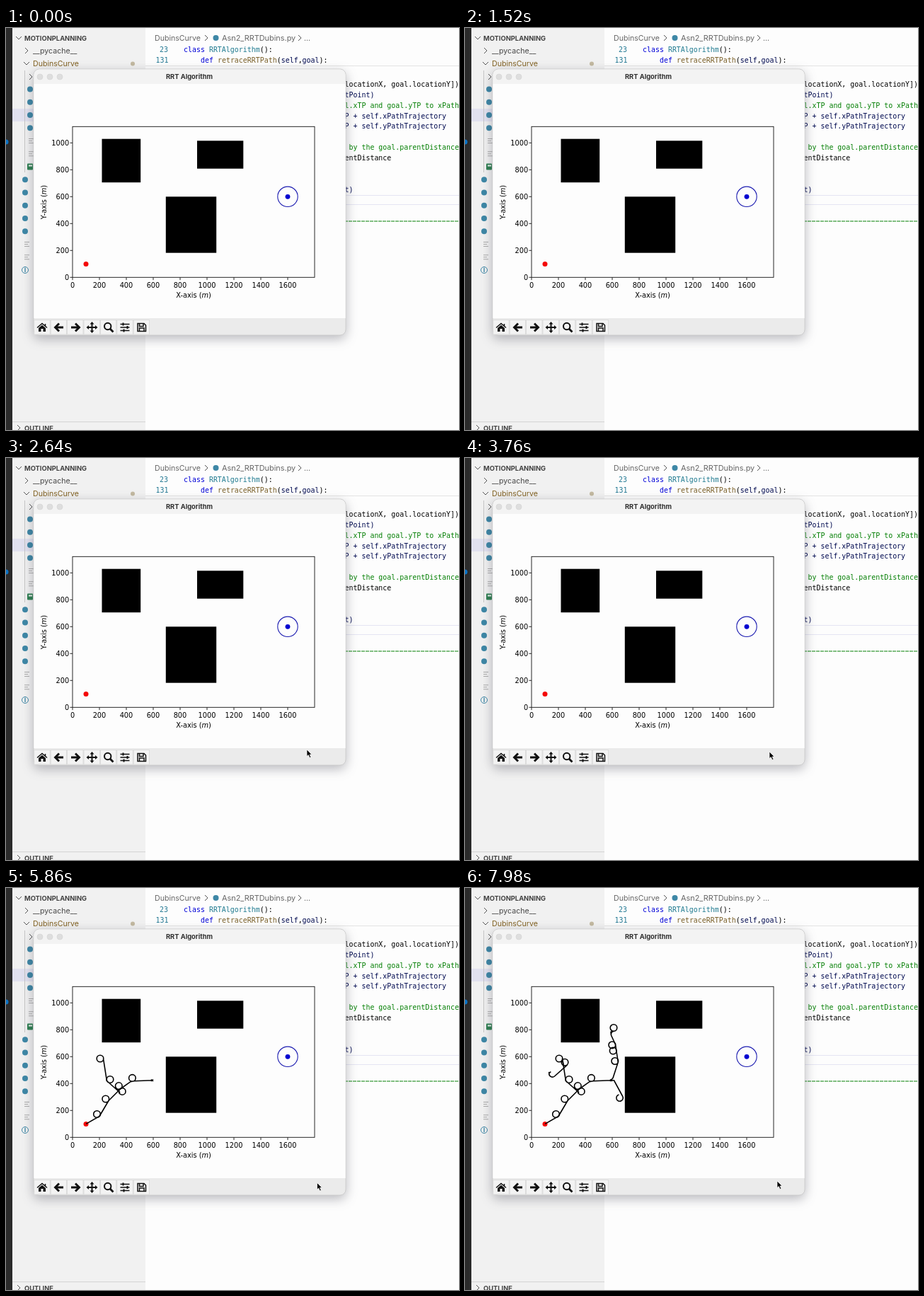
Animation, 640 px wide and 568 px high, one loop 8 s. Source, as an HTML page:

```html
<!DOCTYPE html>
<html lang="en">
<head>
<meta charset="utf-8">
<title>RRT Algorithm</title>
<style>
  html, body { margin: 0; width: 100%; height: 100%; overflow: hidden; background: #fdfdfd; }
  svg { display: block; width: 640px; height: 568px; }
  .ui { font-family: Inter, "Open Sans", sans-serif; font-size: 10.6px; }
  .file { font-size: 10.9px; }
  .bold { font-weight: 700; font-size: 9.35px; }
  .code { font-family: "DejaVu Sans Mono", monospace; font-size: 9.95px; }
  .plot { font-family: "DejaVu Sans", sans-serif; font-size: 9.8px; fill: #000; }
  .window { filter: drop-shadow(0 5px 8px rgba(60, 60, 75, .35)); }
  .line { fill: none; stroke: #000; stroke-width: 1.6; }
  .icon { fill: none; stroke: #111; stroke-width: 2; }
  .bolder { stroke-width: 2.9; }
  .thin { stroke-width: 1.5; }
  .chevron { fill: none; stroke: #555; stroke-width: 1; }
</style>
</head>
<body>
<svg id="stage" viewBox="0 0 640 568"></svg>
<script>
const LOOP = 8000;
const NS = "http://www.w3.org/2000/svg";
const stage = document.getElementById("stage");

function add(tag, attrs, parent = stage) {
  const el = document.createElementNS(NS, tag);
  for (const [name, value] of Object.entries(attrs)) el.setAttribute(name, value);
  return parent.appendChild(el);
}
const rect = (x, y, width, height, fill, more) => add("rect", { x, y, width, height, fill, ...more });
const dot = (cx, cy, r, fill, more) => add("circle", { cx, cy, r, fill, ...more });
const path = (d, cls, more) => add("path", { d, class: cls, ...more });
function text(x, y, content, cls, fill, more = {}) {
  const el = add("text", { x, y, class: cls, fill, ...more });
  el.textContent = content;
  return el;
}
function code(x, y, ...parts) {
  const el = add("text", { x, y, class: "code" });
  el.style.whiteSpace = "pre";
  for (const [fill, content] of parts) add("tspan", { fill }, el).textContent = content;
}
const right = (x, y) => path(`M${x - 2} ${y - 4}l4 4l-4 4`, "chevron");
const down = (x, y) => path(`M${x - 4} ${y - 2}l4 4l4 -4`, "chevron");

function drawSidebar() {
  const teal = "#3d87a6";
  rect(9, 0, 188, 568, "#f1f1f1");
  rect(0, 0, 9, 568, "#2b2b2b");
  dot(0, 161, 3.5, "#0a74c8");
  down(18, 14);
  text(26, 17.5, "MOTIONPLANNING", "ui bold", "#424242");
  right(29, 32);
  text(38, 36, "__pycache__", "ui", "#484848");
  down(29, 50);
  text(38, 54, "DubinsCurve", "ui", "#806020");
  dot(179, 50.5, 3, "#c2b8a0");
  rect(9, 114, 30, 18, "#e1e1ef");
  rect(26, 60, 1, 144, "#c6c6c6");
  right(35, 69);

  const row = i => 86.5 + i * 18.25;
  const lines = (x, y) => path(`M${x - 3} ${y - 3}h7m-7 3h5m-5 3h7`, "chevron", { opacity: .45 });
  for (let i = 0; i < 4; i++) dot(34, row(i), 4, teal);
  lines(35, row(4));
  lines(35, row(5));
  rect(30, row(6) - 4.5, 8, 9, "#2f8052", { rx: 1 });
  rect(32, row(6) - 2.5, 5, 2, "#eef5f0");
  for (let i = 7; i < 12; i++) dot(27, row(i), 4, teal);
  lines(29, row(12));
  lines(29, row(13));
  dot(27, row(14), 4.5, "none", { stroke: teal });
  text(27, row(14) + 3, "i", "ui bold", teal, { "text-anchor": "middle" });

  rect(9, 556, 188, 1, "#d4d4d4");
  right(18, 565);
  text(26, 568.5, "OUTLINE", "ui bold", "#424242");
}

function drawEditor() {
  const ink = "#000a50", black = "#000", blue = "#0000d8", green = "#068006", num = "#237893", edge = "#e5e5f3";
  text(210, 18, "DubinsCurve", "ui", "#666");
  right(283, 14);
  dot(296.5, 14, 4, "#3d87a6");
  text(305, 18, "Asn2_RRTDubins.py", "ui file", "#666");
  right(415, 14);
  text(421, 18, "...", "ui", "#666");
  code(217, 34, [num, "23"]);
  code(251, 34, [blue, "class "], ["#207b90", "RRTAlgorithm"], [black, "():"]);
  code(211.5, 48.5, [num, "131"]);
  code(275, 48.5, [blue, "def "], ["#795e26", "retraceRRTPath"], [black, "("], [ink, "self"], [black, ","], [ink, "goal"], [black, "):"]);
  rect(197, 53, 443, 1, "#e4e4e4");

  const rows = [
    [83, black, "locationX, goal.locationY])"],
    [97.5, ink, "tPoint)"],
    [112.5, green, "l.xTP and goal.yTP to xPathTrajectory"],
    [127.5, ink, "P + self.xPathTrajectory"],
    [142, ink, "P + self.yPathTrajectory"],
    [172, green, " by the goal.parentDistance"],
    [187, black, "entDistance"],
    [232, ink, "t)"]
  ];
  for (const [y, fill, content] of rows) code(478.5, y, [fill, content]);
  rect(197, 236, 443, 1, edge);
  rect(197, 249, 443, 1, edge);
  path("M478 273H640", "", { stroke: green, "stroke-width": 1, "stroke-dasharray": "5 1" });
}

function drawWindow() {
  rect(39, 58, 441, 376, "#ebebeb", { rx: 8, class: "window", stroke: "#c8c8c8", "stroke-width": .8 });
  path("M39.4 79V66a8 8 0 0 1 8 -7.6h424.2a8 8 0 0 1 8 7.6v13z", "", { fill: "#f3f3f3" });
  rect(39.4, 79, 440.2, 331, "#fdfdfd");
  for (const x of [48, 62, 76]) dot(x, 69, 4, "#dedede", { stroke: "#d2d2d2", "stroke-width": .6 });
  text(259, 72.3, "RRT Algorithm", "ui bold", "#303030", { "text-anchor": "middle" });
}

function drawToolbar() {
  for (let i = 0; i < 7; i++) rect(39.8 + i * 23.4, 412.5, 22.4, 20.5, "#f3f3f3", { stroke: "#d8d8d8", "stroke-width": .8 });
  path("M44 423.5l7 -6l7 6M55.5 418v3", "icon thin");
  path("M46 424l5 -4.3l5 4.3v5h-3.5v-4h-3v4H46z", "", { fill: "#111" });
  path("M81 423H70M75 417.5l-5.5 5.5l5.5 5.5", "icon bolder");
  path("M92 423H103M98 417.5l5.5 5.5l-5.5 5.5", "icon bolder");
  path("M121.5 417v12M115.5 423h12", "icon");
  for (const angle of [0, 90, 180, 270])
    path("M121.5 415l3 3.5h-6z", "", { fill: "#111", transform: `rotate(${angle} 121.5 423)` });
  dot(143.7, 421.5, 4.7, "none", { class: "icon" });
  path("M147 425l4.5 4.5", "icon bolder");
  path("M161.5 418.5h13M161.5 423h13M161.5 427.5h13", "icon thin");
  path("M165.5 416.5v4M171.5 421v4M166.5 425.5v4", "icon");
  path("M186 417.5h9l2.5 2.5v8.5h-11.5z", "icon thin");
  path("M188.5 418v3.5h5.5v-3.5M188.5 428v-4h6.5v4", "icon thin");
}

function drawPlot() {
  const mid = { "text-anchor": "middle" };
  const px = x => 94 + x * .19, py = y => 352.3 - y * .19;
  for (const [x, y, w, h] of [[135.5, 156.7, 54.7, 61.5], [270, 159.3, 65.3, 39.4], [225.8, 238.3, 71.4, 79.4]])
    rect(x, y, w, h, "#000");
  rect(94, 139.3, 342, 213, "none", { stroke: "#111", "stroke-width": .9 });
  for (let v = 0; v <= 1600; v += 200) {
    path(`M${px(v)} 352.5v3.6`, "", { stroke: "#111", "stroke-width": .9 });
    text(px(v), 366.8, v, "plot", "#000", mid);
  }
  for (let v = 0; v <= 1000; v += 200) {
    path(`M94 ${py(v)}h-3.6`, "", { stroke: "#111", "stroke-width": .9 });
    text(89.2, py(v) + 3.7, v, "plot", "#000", { "text-anchor": "end" });
  }
  const axisLabel = (name, attrs) => {
    const el = text(0, 0, name + "-axis (", "plot", "#000", { ...mid, ...attrs });
    add("tspan", { "font-style": "oblique" }, el).textContent = "m";
    add("tspan", {}, el).textContent = ")";
  };
  axisLabel("X", { transform: "translate(265 380.8)" });
  axisLabel("Y", { transform: "translate(57 246) rotate(-90)" });
  dot(398, 238.3, 14.2, "none", { stroke: "#1a1ab0", "stroke-width": 1.1 });
  dot(398, 238.3, 3.4, "#0000d0");
  dot(113, 333.4, 3.5, "#f40808");
}

// Tree branches: [time shown, path, optional loop centre]
const branches = [
  [4320, "M113 333.4L132 322.5", 128.5, 319.5],
  [4580, "M132 322.5L145 300.5", 140.8, 298],
  [4840, "M145 300.5L163 282.5", 159.3, 279.6],
  [5060, "M154 281.5L161 289", 164.2, 287.4],
  [5260, "M161 289L143 273", 147, 270.5],
  [5480, "M142.5 273L137.5 241", 133, 241],
  [5640, "M160 285L176 273.7L181 272.7", 178.4, 268.4],
  [5800, "M181 272.7L207 271.8M205 270.5l3 2.5m-3 0l3 -2.5"],
  [6060, "M137.5 241L139 250", 141, 246.3],
  [6320, "M144.5 250L126.5 266A4.7 4.7 0 0 1 118.8 262l2.5 -2.5m-2.7 .3l.4 3"],
  [6580, "M207 271.8H210.5L222.5 294A4.7 4.7 0 1 1 217.5 292"],
  [6840, "M206 271.5L209 268.5L216 247", 211.8, 244.5],
  [7080, "M216.3 246L214 231", 209.2, 230],
  [7320, "M214 232L212.5 220", 207.8, 221.8],
  [7560, "M212.5 221L206.5 208A4.7 4.7 0 0 1 210 202.5"],
  [7800, "M206.5 207L206 203.5L208.5 202", 210, 197.5]
];
// Pointer tip: [time, x, y]
const pointerPath = [[2000, 422, 410], [2640, 425, 412], [3760, 430, 415], [4920, 435, 416.5], [5860, 439.5, 416.5], [7980, 441, 414]];

drawSidebar();
drawEditor();
drawWindow();
drawToolbar();
drawPlot();

const tree = branches.map(([time, d, x, y]) => {
  const loop = x ? `M${x - 4.8} ${y}a4.8 4.8 0 1 1 9.6 0a4.8 4.8 0 1 1 -9.6 0` : "";
  return { time, el: path(d + loop, "line") };
});
const pointer = path("M0 0V9.6L2.2 7.6L4 11.5L5.8 10.7L4.1 7H7z", "", { fill: "#000", stroke: "#fff", "stroke-width": .7 });

function pointerAt(time) {
  const next = pointerPath.findIndex(step => step[0] > time);
  if (next < 0) return pointerPath.at(-1).slice(1);
  const [t0, x0, y0] = pointerPath[next - 1], [t1, x1, y1] = pointerPath[next];
  const k = (time - t0) / (t1 - t0);
  return [x0 + (x1 - x0) * k, y0 + (y1 - y0) * k];
}

function render(now) {
  const time = now % LOOP;
  for (const { time: start, el } of tree) el.style.display = time >= start ? "" : "none";
  const shown = time >= pointerPath[0][0];
  pointer.style.display = shown ? "" : "none";
  if (shown) pointer.setAttribute("transform", `translate(${pointerAt(time)})`);
}

const begin = performance.now();
function tick() {
  render(performance.now() - begin);
  requestAnimationFrame(tick);
}
tick();
</script>
</body>
</html>
```
